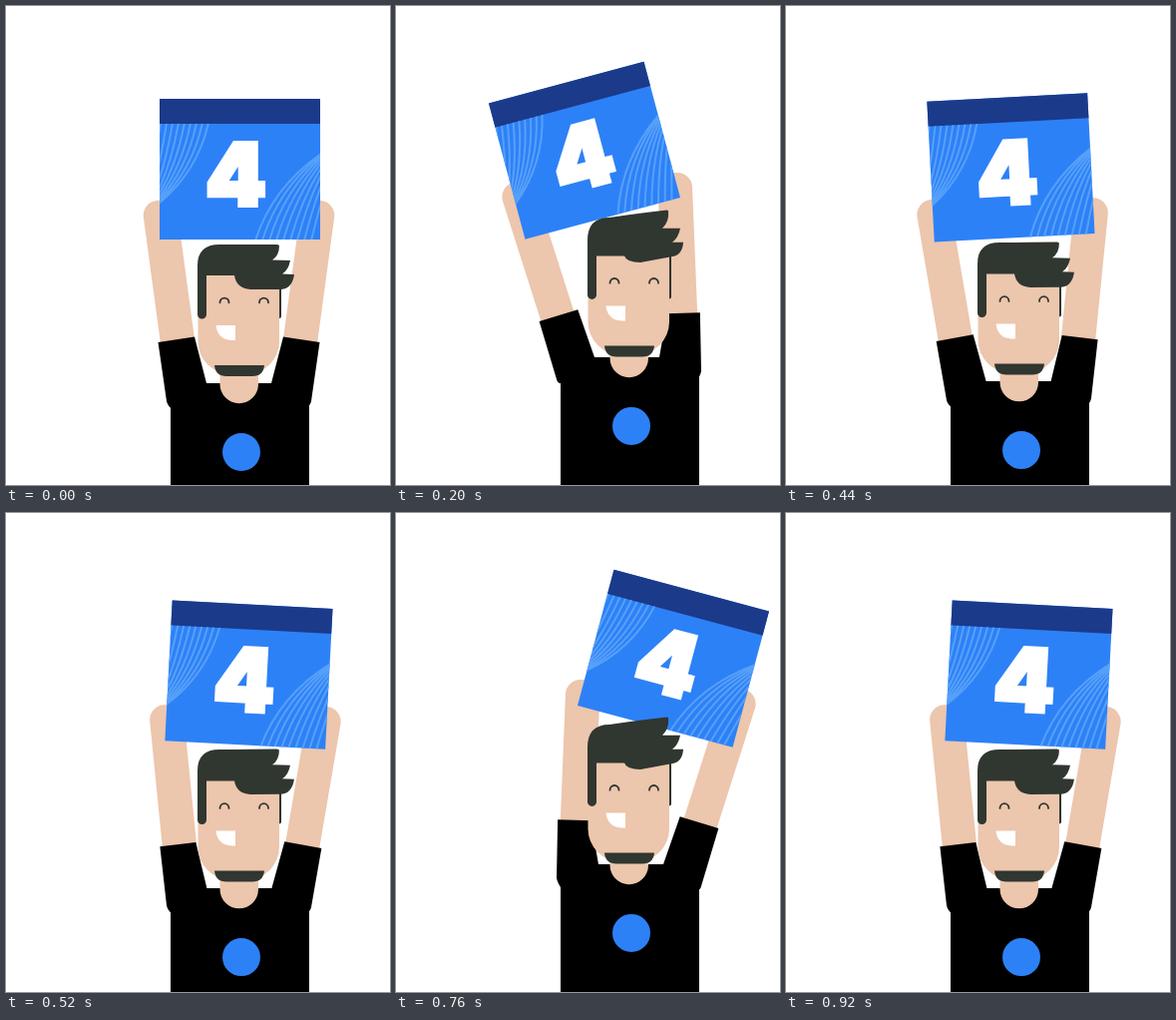
An HTML page for the animation above (960 ms loop, 385x480 px).

```html
<!DOCTYPE html>
<html lang="en">
<head>
<meta charset="utf-8">
<title>Countdown cheer</title>
<style>
  html, body { margin: 0; width: 100%; height: 100%; overflow: hidden; background: #fff; }
  svg { display: block; width: 385px; height: 480px; }
  .skin { fill: #ecc6ad; }
  .hair { fill: #303630; }
  .blue { fill: #2d81f7; }
  .eyes { fill: none; stroke: #303630; stroke-width: 1.8; stroke-linecap: round; }
  .lines { fill: none; stroke: #56a0f9; stroke-width: 2; }
  text {
    font: 900 87px Inter, "Open Sans", sans-serif;
    font-optical-sizing: none;
    fill: #fff; stroke: #fff; stroke-width: 4; text-anchor: middle;
  }
</style>
</head>
<body>
<svg viewBox="0 0 385 480">
  <defs>
    <clipPath id="panel"><path d="M154 118h161v116H154z"/></clipPath>
    <path id="forearm" class="skin" d="M162.5 363V208a15 15 0 0 1 15-15h4.4a15 15 0 0 1 15 15V363z"/>
  </defs>
  <g id="arms">
    <use id="armL" href="#forearm"/>
    <g transform="matrix(-1 0 0 1 467 0)"><use id="armR" href="#forearm"/></g>
  </g>
  <g id="sign">
    <path class="blue" d="M154 93h161v141H154z"/>
    <path fill="#1b3a8a" d="M154 93h161v25H154z"/>
    <path id="lines" class="lines" clip-path="url(#panel)"/>
    <text x="230.5" y="200">4</text>
  </g>
  <g id="torso">
    <path id="sleeveL"/>
    <path id="sleeveR" transform="matrix(-1 0 0 1 467 0)"/>
    <path d="M165 378h139v140H165z"/>
    <path class="skin" d="M214.5 358h38.5v21a19.25 19.25 0 0 1-38.5 0z"/>
    <circle class="blue" cx="236" cy="447" r="19"/>
  </g>
  <g id="head">
    <path class="skin" d="M192.5 262H274v74a33 33 0 0 1-33 33h-15.5a33 33 0 0 1-33-33z"/>
    <path class="hair" d="M274 268h2v43q0 2-2 2z"/>
    <path class="hair" d="M209 360h50q-1 11-12 11h-26q-11 0-12-11z"/>
    <path id="hair" class="hair"/>
    <path class="eyes" d="M214.5 297.300a4.5 4.7 0 0 1 9 0M254 297.300a4.5 4.7 0 0 1 9 0"/>
    <path fill="#fff" d="M210.5 320H230v15h-4q-14-1-15.500-15z"/>
  </g>
</svg>
<script>
  const LOOP = 960, STEP = 40;
  const $ = id => document.getElementById(id);
  const set = (id, name, value) => $(id).setAttribute(name, value);
  const rise = (id, dy) => set(id, 'transform', `translate(0 ${-dy})`);

  // Fan of curves in two corners of the panel
  let fan = '';
  for (let i = 0; i < 9; i++) {
    fan += `M${203 - 6 * i} 117Q${192 - 5.5 * i} 166 ${153 - 1.5 * i} 198`;
    fan += `M${250 + 7 * i} 235Q${267 + 6.5 * i} 182 ${316 + 2 * i} 148`;
  }
  set('lines', 'd', fan);

  // Sleeve outline for the left arm, leaning outwards by the given degrees
  function sleeve(out) {
    const a = out * Math.PI / 180, c = Math.cos(a), s = Math.sin(a);
    const turn = (x, y) => [177.5 + x * c + y * s, 383.5 + y * c - x * s];
    const [ax, ay] = turn(-25, -46.5);
    const [bx, by] = turn(11.5, -52);
    const oy = 396 + out * .4;
    return `M${ax - out * .12} ${ay}L${bx + out * .25} ${by}L${201 - out * .2} 378V420H167V404` +
      `Q162 ${oy + 5} 161 ${oy}Z`;
  }

  // Hair tips flick upwards as p goes from 0 to 1
  function hair(p) {
    const y = (base, lift) => base - lift * p;
    return `M192 ${y(260, 6)}Q192 ${y(239, 8)} 214 ${y(239, 8)}` +
      `Q246 ${y(239, 13)} 272 ${y(239, 16)}L${274 - p} ${y(240, 16)}` +
      `Q274 ${y(250, 15)} 267 ${y(254.5, 13)}L285 ${y(255, 13.5)}` +
      `Q283 ${y(265, 13.5)} 277 ${y(268.5, 13)}L${289 - p} ${y(269, 13.5)}` +
      `Q287 ${y(283, 14)} 276 ${y(284, 14)}L245 ${y(284, 8)}` +
      `Q231 ${y(283, 7)} 229 270H201V309a4.5 4.5 0 0 1-9 0Z`;
  }

  function draw(now) {
    const t = Math.floor(now % LOOP / STEP) * STEP;
    const p = (1 - Math.cos(4 * Math.PI * t / LOOP)) / 2;
    // Triangle wave: left at a quarter, right at three quarters
    const q = t / LOOP * 4;
    const wave = q < 1 ? q : q < 3 ? 2 - q : q - 4;
    const lean = 12 * wave;
    const arm = out => `rotate(${-7.7 - out} 179.7 393)`;

    rise('arms', 28 * p);
    rise('torso', 28 * p);
    rise('head', 21 * p);
    set('sign', 'transform', `translate(${-p} ${-25.8 * p}) rotate(${-18 * wave} 232.6 335.5)`);
    set('armL', 'transform', arm(lean));
    set('armR', 'transform', arm(-lean));
    set('sleeveL', 'd', sleeve(lean));
    set('sleeveR', 'd', sleeve(-lean));
    set('hair', 'd', hair(p));
  }

  function tick() {
    draw(performance.now());
    requestAnimationFrame(tick);
  }
  tick();
</script>
</body>
</html>
```
